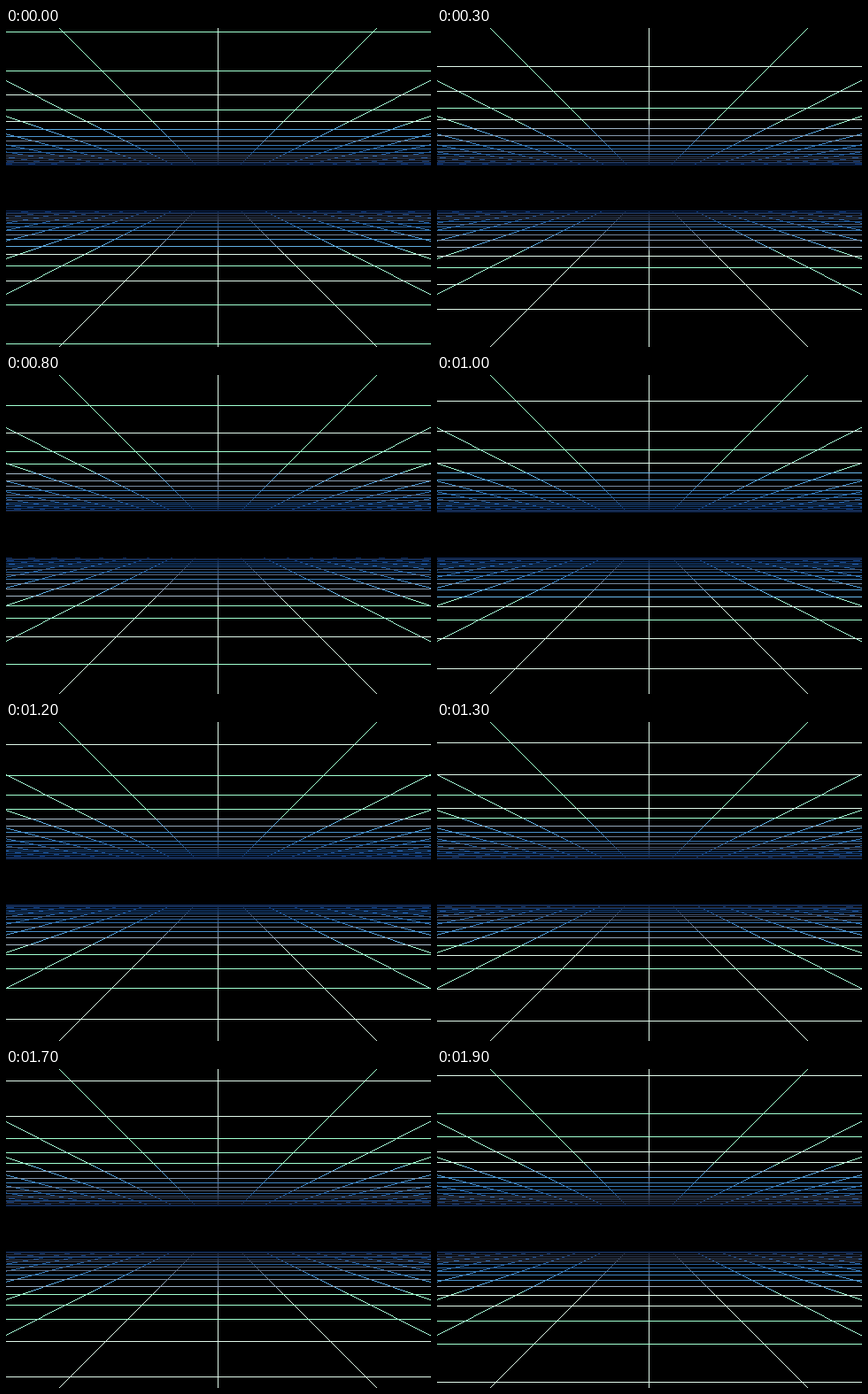
Animation of 480 by 360 pixels, one loop 2 s. Source, as an HTML page:

```html
<!DOCTYPE html>
<html lang="en">
<head>
<meta charset="utf-8">
<title>Endless grid</title>
<style>
  html, body { margin: 0; width: 100%; height: 100%; overflow: hidden; background: #000; }
  svg { display: block; width: 480px; height: 360px; background: #000; shape-rendering: crispEdges; }
</style>
</head>
<body>
<svg id="stage" viewBox="0 0 480 360"></svg>
<script>
const NS = 'http://www.w3.org/2000/svg';
const stage = document.getElementById('stage');
const W = 480, HALF = 180, CX = 239.5;
const LOOP = 2000, STEP = 100;
const SCALE = 528, SPREAD = 0.995;
const FAR = 26, FOG = 72;   // distances from the horizon: first visible, fully lit

// Colour when lit, colour inside the fog, and how fast each channel fades
const MINT = { lit: [160, 255, 208], fog: [110, 190, 240], fade: [1.2, 0.8, 0.5] };
const PALE = { lit: [222, 246, 232], fog: [175, 195, 210], fade: [1, 0.9, 0.7] };

function add(parent, tag, attrs) {
  const el = document.createElementNS(NS, tag);
  for (const key in attrs) el.setAttribute(key, attrs[key]);
  parent.appendChild(el);
  return el;
}

function shade(tone, d) {
  if (d >= FOG) return `rgb(${tone.lit})`;
  const t = (d - 18) / (FOG - 18);
  return `rgb(${tone.fog.map((c, i) => Math.round(c * t ** tone.fade[i]))})`;
}

const defs = add(stage, 'defs', {});

function addGradient(id, tone, side) {
  const g = add(defs, 'linearGradient', {
    id, gradientUnits: 'userSpaceOnUse', x1: 0, x2: 0, y1: HALF, y2: HALF + side * HALF
  });
  for (let d = FAR; d <= FOG; d += 2) {
    add(g, 'stop', { offset: d / HALF, 'stop-color': shade(tone, d) });
  }
}

// One-pixel stair line: stepped by rows when steep, by columns when flat
function railPath(k, side) {
  let path = '';
  const dot = (x, y) => { path += `M${x} ${y + 0.5}h1`; };
  if (Math.abs(k) < 2) {
    for (let d = FAR + 0.5; d < HALF; d++) {
      dot(Math.floor(CX + k * d * SPREAD), Math.floor(HALF + side * d));
    }
  } else {
    for (let x = 0; x < W; x++) {
      const d = (x + 0.5 - CX) / (k * SPREAD);
      if (d >= FAR) dot(x, Math.floor(HALF + side * d));
    }
  }
  return path;
}

// Rails running towards the horizon, on the ceiling (-1) and the floor (1)
for (const side of [-1, 1]) {
  const name = side < 0 ? 'top' : 'bottom';
  addGradient(name + 'Mint', MINT, side);
  addGradient(name + 'Pale', PALE, side);
  for (let k = -9; k <= 9; k++) {
    const pale = k === 0 || (side > 0 && Math.abs(k) === 1);
    add(stage, 'path', {
      d: railPath(k, side), fill: 'none',
      stroke: `url(#${name}${pale ? 'Pale' : 'Mint'})`
    });
  }
}

// Cross bars that move towards the viewer
const bars = [];
for (let n = 21; n >= 3; n--) {
  for (const side of [-1, 1]) {
    bars.push({ n, side, el: add(stage, 'rect', { x: 0, width: W, height: 1 }) });
  }
}

function render(ms) {
  const shift = Math.floor((ms % LOOP) / STEP) * STEP / LOOP;
  for (const { n, side, el } of bars) {
    const d = Math.floor(SCALE / (n - shift) + 0.25);
    const shown = d >= FAR && d <= HALF;
    el.setAttribute('display', shown ? 'inline' : 'none');
    if (!shown) continue;
    el.setAttribute('y', HALF + side * d);
    el.setAttribute('fill', shade(d % 2 ? PALE : MINT, d));
  }
}

let start;
function tick(now) {
  if (start === undefined) start = now;
  render(now - start);
  requestAnimationFrame(tick);
}
render(0);
requestAnimationFrame(tick);
</script>
</body>
</html>
```
